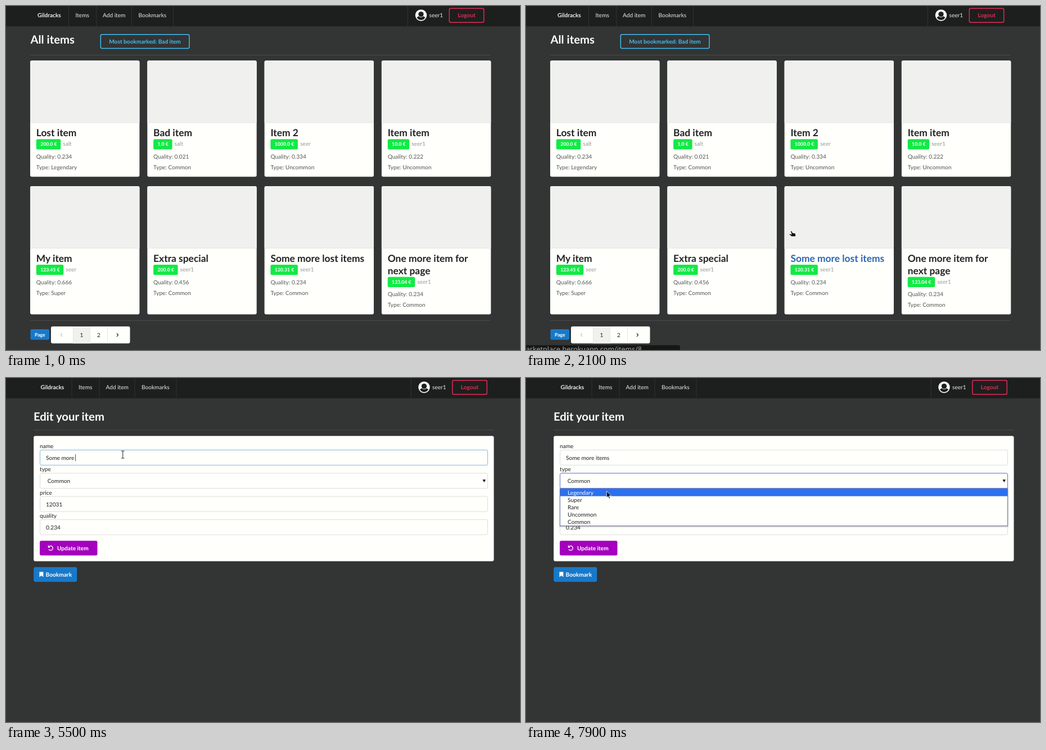
These frames come from a looping animation (914x613 px, 8 s). An HTML page:

```html
<!DOCTYPE html>
<html lang="en">
<head>
<meta charset="utf-8">
<title>Item market</title>
<style>
  html, body { margin: 0; width: 100%; height: 100%; overflow: hidden; background: #333434; }
  svg { display: block; width: 100vw; height: 100vh; }
  text { font-family: Lato, sans-serif; font-size: 10.15px; text-rendering: geometricPrecision; white-space: pre; }
  .b { font-weight: 700; }
  .mid { text-anchor: middle; }
  .small { font-size: 8.7px; }
  .h1 { font-size: 20.3px; }
  .h2 { font-size: 17.4px; }
  .status { font-family: "Noto Sans", sans-serif; font-size: 12.5px; text-anchor: end; }
</style>
</head>
<body>
<svg id="stage" viewBox="0 0 914 613"></svg>
<script>
const LOOP = 8000, TICK = 100;
const PAPER = '#fffffc', INK = '#222', WHITE = '#fffffc', BLUE = '#1879c9', NAV = '#1d1f1f', RULE = '#4a4b4a';
const stage = document.getElementById('stage');

const text = (x, y, s, fill = INK, cls = '') => `<text x="${x}" y="${y}" fill="${fill}" class="${cls}">${s}</text>`;
const rect = (x, y, w, h, fill, r = 0, more = '') =>
  `<rect x="${x}" y="${y}" width="${w}" height="${h}" rx="${r}" fill="${fill}" ${more}/>`;
const path = (d, more) => `<path d="${d}" ${more}/>`;
const outline = (x, y, w, h, color, width = 1, fill = 'none') =>
  rect(x, y, w, h, fill, 2.5, `stroke="${color}" stroke-width="${width}"`);
const group = (x, y, body) => `<g transform="translate(${x} ${y})">${body}</g>`;

// Navigation bar

const avatar = `<circle cx="738" cy="16.5" r="10.2" fill="#fff"/>
  <circle cx="738" cy="14.6" r="4.7" fill="${NAV}"/>
  <path d="M730.6 20.8Q732 18.4 734 18.2Q738 22 742 18.2Q744 18.4 745.4 20.8A8.6 8.6 0 0 1 730.6 20.8Z" fill="${NAV}"/>`;

function nav(dx) {
  const links = [[123.5, 'Items'], [172, 'Add item'], [235.5, 'Bookmarks']];
  const lines = [111, 160, 223, 297, 714];
  return rect(0, 0, 914, 36.3, NAV) + group(dx, 0,
    lines.map(x => rect(x, 0, 1, 36.3, '#303231')).join('') +
    text(56, 20.2, 'Gildracks', '#eee', 'b') +
    links.map(([x, s]) => text(x, 20.2, s, '#e8e8e8')).join('') +
    avatar + text(752.5, 19.8, 'seer1', '#e8e8e8') +
    outline(788.3, 4.3, 61.4, 25, '#e22c52', 1.5) +
    text(819, 20.2, 'Logout', '#e22c52', 'b mid'));
}

// Item list

const cards = [
  [['Lost item'], '200.0', 'salt', '0.234', 'Legendary'],
  [['Bad item'], '1.0', 'salt', '0.021', 'Common'],
  [['Item 2'], '1000.0', 'seer', '0.334', 'Uncommon'],
  [['Item item'], '10.0', 'seer1', '0.222', 'Uncommon'],
  [['My item'], '123.45', 'seer', '0.666', 'Super'],
  [['Extra special'], '200.0', 'seer1', '0.456', 'Common'],
  [['Some more lost items'], '120.31', 'seer1', '0.234', 'Common'],
  [['One more item for', 'next page'], '123.04', 'seer1', '0.234', 'Common'],
];

function card([titles, price, owner, quality, type], index, hovered) {
  const row = Math.floor(index / 4);
  const tagWidth = 23.5 + 5 * (price.length - 1);
  const details = rect(10.8, 140, tagWidth, 18.2, '#12ea45', 2.5) +
    text(18.2, 152.2, price + ' €', '#fff', 'b small') +
    text(10.8 + tagWidth + 4, 152.2, owner, '#999a98') +
    text(10.8, 174.5, 'Quality: ' + quality, '#555') +
    text(10.8, 193.5, 'Type: ' + type, '#555');
  return group(43 + 208.3 * (index % 4), 97.3 + 223.8 * row,
    rect(0, 0, 194.4, row ? 228.3 : 207, PAPER, 3) +
    path('M0 110.7V3Q0 0 3 0H191.4Q194.4 0 194.4 3V110.7Z', 'fill="#f0f1ee"') +
    rect(0, 110, 194.4, 1, '#e4e5e2') +
    titles.map((s, i) => text(10.8, 135 + 21.7 * i, s, hovered ? '#2d66b3' : INK, 'b h2')).join('') +
    group(0, 21.7 * (titles.length - 1), details));
}

function pagination() {
  const chevron = (d, color) => path(d, `fill="none" stroke="${color}" stroke-width="1.2"`);
  return rect(43.5, 576, 33.5, 18.7, BLUE, 2.5) + text(60.3, 588.6, 'Page', '#fff', 'b small mid') +
    rect(80, 571, 140.5, 30.3, PAPER, 3) + rect(119, 571, 30.5, 30.3, '#f0f1ee') +
    [119, 149.5, 180].map(x => rect(x, 571, 0.8, 30.3, '#e2e3e0')).join('') +
    chevron('M100 583.5L97.6 586.3L100 589.1', '#c4c4c2') +
    text(134.5, 590, '1', INK, 'mid') + text(165, 590, '2', INK, 'mid') +
    chevron('M197 583.5L199.4 586.3L197 589.1', INK);
}

function statusBar(id) {
  return path('M0 604.5H271Q274 604.5 274 607.5V613H0Z', 'fill="#151616"') +
    text(206, 616, 'marketplace.herokuapp.com/items/' + id, '#a2a4a2', 'status');
}

function listPage(t) {
  const hovered = t >= 300 && t < 600 ? 5 : t >= 1200 ? 6 : -1;
  const status = t >= 400 && t < 900 ? 6 : t >= 1600 ? 8 : 0;
  return nav(0) + text(43.5, 66.5, 'All items', WHITE, 'b h1') +
    outline(168.3, 50.8, 157.6, 24.6, '#3fbdf0', 1.5) +
    text(247, 66.8, 'Most bookmarked: Bad item', '#3fbdf0', 'b mid') +
    rect(43.5, 87, 818.5, 1, RULE) + rect(43.5, 560, 818.5, 1, RULE) +
    cards.map((c, i) => card(c, i, i === hovered)).join('') +
    pagination() + (status ? statusBar(status) : '');
}

// Edit form

const edits = [
  [0, 'lost items'], [3500, 'lost item'], [3800, 'lost it'], [4000, 'lost i'], [4100, 'lost '],
  [4400, 'los'], [4700, 'l'], [4900, ''], [5800, 'i'], [5900, 'ite'], [6200, 'item'], [6500, 'items'],
];
const itemName = t => 'Some more ' + edits.filter(([at]) => at <= t).pop()[1];

function dropdown(active) {
  const options = ['Legendary', 'Super', 'Rare', 'Uncommon', 'Common'];
  return rect(60.5, 197, 796, 66.5, PAPER, 0,
      'stroke="#6672a8" style="filter:drop-shadow(0 1.5px 1.5px rgba(0,0,0,.3))"') +
    rect(61, 197.2 + 13.15 * active, 795, 13.4, '#2b70ee') +
    options.map((s, i) => text(74, 207.6 + 13.15 * i, s, i === active ? '#fff' : INK)).join('');
}

function editPage(t) {
  const open = t >= 7300, focused = t >= 3200 && !open;
  const fields = [['name', itemName(t), 71], ['type', 'Common', 73.7], ['price', '12031', 71], ['quality', '0.234', 71]];
  const form = fields.map(([label, value, x], i) => {
    const y = 41.35 * i;
    const border = i === 0 && focused ? '#85b7d9' : i === 1 && open ? '#5b6bd5' : '#dcddda';
    return text(60, 125 + y, label) + outline(60.5, 128.3 + y, 796, 27, border, 1, PAPER) + text(x, 146 + y, value);
  }).join('');
  const undo = path('M76.2 300.6A4 4 0 1 1 76 305.4M75.4 298.6V301.6H78.4',
    'fill="none" stroke="#fff" stroke-width="1.3"');
  return nav(5.5) + text(49, 76, 'Edit your item', WHITE, 'b h1') + rect(49, 92.3, 818.5, 1, RULE) +
    rect(49.2, 103.2, 818.3, 223.3, PAPER, 3) + form +
    (t >= 5500 && t < 5800 ? rect(123.3, 136, 0.8, 12, INK) : '') +
    path('M847.6 181H853L850.3 186Z', 'fill="#111"') +
    rect(60, 290, 102.5, 26.2, '#a400bd', 3) + undo + text(91, 306.7, 'Update item', '#fff', 'b') +
    rect(49.2, 337, 77, 26.2, BLUE, 3) + path('M59.4 345.5H66.4V354.8L62.9 352L59.4 354.8Z', 'fill="#fff"') +
    text(70.6, 353.8, 'Bookmark', '#fff', 'b') +
    (open ? dropdown(t < 7700 ? 4 : 0) : '');
}

// Pointer: each move is [first step, last step, x, y]

const moves = [
  [300, 300, 385, 368], [400, 700, 405, 453], [800, 900, 458, 459], [1100, 1400, 515, 456],
  [1600, 1700, 505, 448], [2000, 2100, 472, 401], [2200, 2200, 342.5, 211.5], [2400, 2500, 227, 113],
  [2700, 2800, 220, 114], [3000, 3000, 207.7, 136.5], [6800, 6900, 196, 150], [7100, 7100, 189.5, 172.5],
  [7200, 7300, 150, 182], [7600, 7900, 143.3, 201.5],
];

const shapes = {
  arrow: path('M0 0V11.8L2.7 9.3L4.5 13.4L6.4 12.6L4.6 8.6H8.3Z',
    'fill="#111" stroke="#fff" stroke-width=".8"'),
  hand: path('M-.8 0Q.6-.6 1 .8L2 3.2L6 4Q7.6 4.4 7.4 6V9.8H.6L-3.6 6.4Q-4.2 5 -2.6 5L.2 6L-1.2 1.4Q-1.6.3 -.8 0Z',
    'fill="#111" stroke="#fff" stroke-width=".7"'),
  beam: path('M-2.8-6.5H-.8L0-6L.8-6.5H2.8M0-6V6M-2.8 6.5H-.8L0 6L.8 6.5H2.8',
    'fill="none" stroke="#333" stroke-width="1.1"'),
};

function pointer(t) {
  if (t < moves[0][0]) return '';
  let x = moves[0][2], y = moves[0][3];
  for (const [first, last, toX, toY] of moves) {
    if (t < first) break;
    const p = Math.min(1, (t - first + TICK) / (last - first + TICK));
    x += (toX - x) * p;
    y += (toY - y) * p;
  }
  const overLink = t < 600 || (t >= 1200 && t < 2200);
  const overField = t >= 3000 && t < 6900;
  return group(x, y, shapes[overLink ? 'hand' : overField ? 'beam' : 'arrow']);
}

let shown = -1;
function frame() {
  const t = Math.floor(performance.now() % LOOP / TICK) * TICK;
  if (t !== shown) {
    shown = t;
    stage.innerHTML = (t < 2200 ? listPage(t) : editPage(t)) + pointer(t);
  }
  requestAnimationFrame(frame);
}
frame();
</script>
</body>
</html>
```
